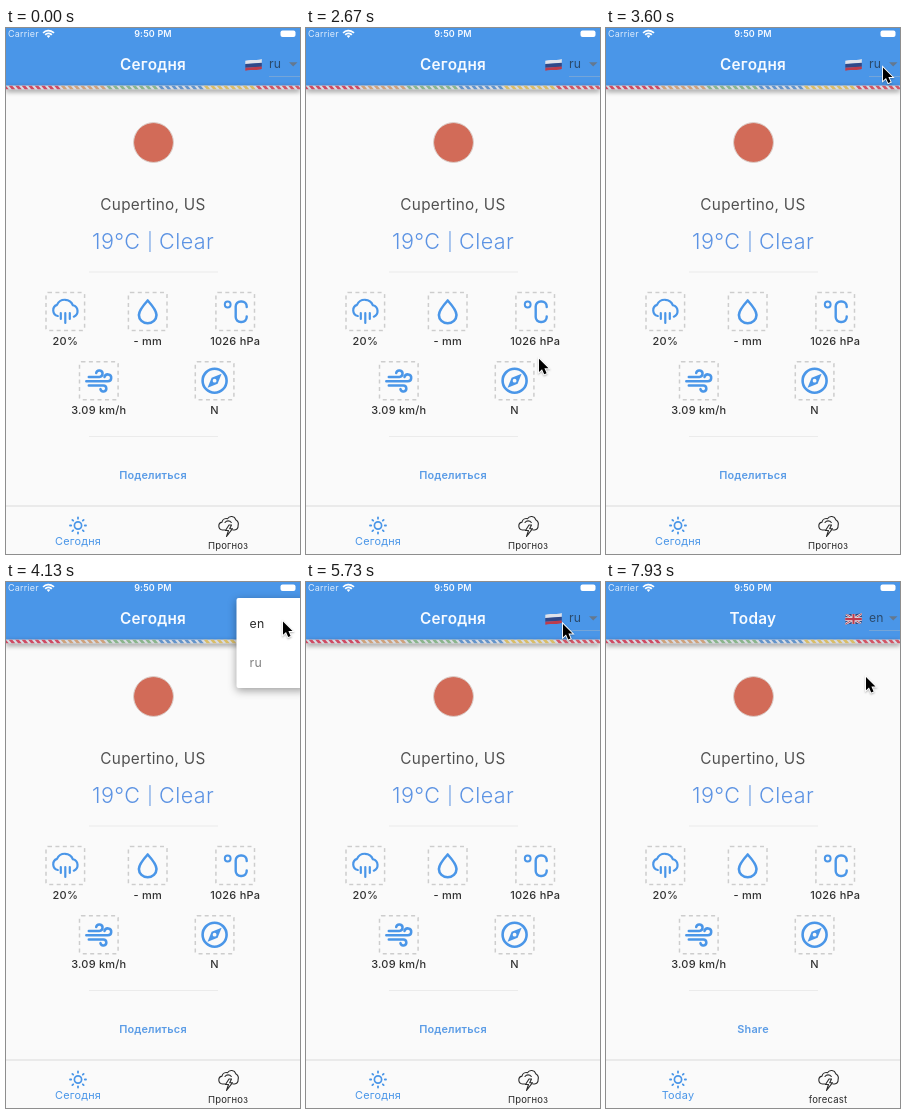
Animation of 294 by 526 pixels, one loop 8 s. Source, as an HTML page with a canvas:

```html
<!DOCTYPE html>
<html lang="en">
<head>
<meta charset="utf-8">
<title>Weather</title>
<style>
  html, body { margin: 0; width: 100%; height: 100%; overflow: hidden; background: #fafafa; }
  canvas { display: block; width: 294px; height: 526px; }
</style>
</head>
<body>
<canvas id="stage"></canvas>
<script>
const W = 294, H = 526, LOOP = 8000;
const OPEN = 3870, CLOSE = 5640, SWITCH = 5740;
const BLUE = '#4a96e8', INK = '#303030';
const FONT = 'Inter, Roboto, "Noto Sans", sans-serif';
const WORDS = {
  ru: { title: 'Сегодня', share: 'Поделиться', next: 'Прогноз' },
  en: { title: 'Today', share: 'Share', next: 'forecast' }
};
// time, x, y of the pointer tip
const TRACK = [
  [1600, 228, 540], [1870, 229, 520.5], [2400, 231, 430], [2670, 233, 331],
  [3270, 258, 200], [3560, 277, 39.5], [4250, 277, 39.5], [4750, 256, 82],
  [4920, 256, 82], [5350, 257, 42], [5800, 257, 42], [6400, 251, 140.5],
  [7440, 251, 140.5], [7900, 260, 95], [8000, 260, 95]
];

const canvas = document.getElementById('stage');
const dpr = window.devicePixelRatio || 1;
canvas.width = W * dpr;
canvas.height = H * dpr;
const c = canvas.getContext('2d');

const clamp = v => Math.max(0, Math.min(1, v));
const ease = v => { v = clamp(v); return v * v * (3 - 2 * v); };

function rect(x, y, w, h, fill) {
  c.fillStyle = fill;
  c.fillRect(x, y, w, h);
}

function text(s, x, y, size, weight, color, align = 'center') {
  c.font = `${weight} ${size}px ${FONT}`;
  c.letterSpacing = `${size * 0.02}px`;
  c.textAlign = align;
  c.fillStyle = color;
  c.fillText(s, x, y);
}

function stroke(d, color, width) {
  c.strokeStyle = color;
  c.lineWidth = width;
  c.lineCap = c.lineJoin = 'round';
  c.stroke(new Path2D(d));
}

function disc(x, y, r) {
  c.beginPath();
  c.arc(x, y, r, 0, 7);
}

function ring(x, y, r, color, width) {
  disc(x, y, r);
  c.strokeStyle = color;
  c.lineWidth = width;
  c.stroke();
}

function at(x, y, draw) {
  c.save();
  c.translate(x, y);
  draw();
  c.restore();
}

function withShadow(color, blur, dy, draw) {
  c.save();
  c.shadowColor = color;
  c.shadowBlur = blur * dpr;
  c.shadowOffsetY = dy * dpr;
  draw();
  c.restore();
}

const icons = {
  rain() {
    stroke('M-7.5 4.5A5.8 5.8 0 0 1 -8.3 -6.6A8.6 8.6 0 0 1 7.6 -6.2A6 6 0 0 1 8.5 5.2' +
      'M-4.5 1.5V7.5M0 1.5V11.5M4.5 1.5V7.5', BLUE, 2.2);
  },
  drop() {
    stroke('M0 -11C-5 -5.5 -8.8 -1 -8.8 3.5A8.8 8.3 0 0 0 8.8 3.5C8.8 -1 5 -5.5 0 -11Z', BLUE, 2.6);
  },
  celsius() {
    ring(-7.5, -7, 2.9, BLUE, 2);
    stroke('M11.5 -4.5V-5A5 5 0 0 0 6.5 -10H5.5A5 5 0 0 0 0.5 -5V5.5A5 5 0 0 0 5.5 10.5H6.5A5 5 0 0 0 11.5 5.5V5', BLUE, 2.4);
  },
  wind() {
    stroke('M-10 -3.8H0.5A3.2 3.2 0 1 0 -2.6 -7.6M-12.5 0.5H9A3.4 3.4 0 1 0 5.7 -3.6' +
      'M-10 4.8H4.5A3 3 0 1 1 1.6 8.4', BLUE, 2.5);
  },
  compass() {
    ring(0, 0, 12, BLUE, 2.6);
    c.fillStyle = BLUE;
    c.fill(new Path2D('M7 -7L3 3L-7 7L-3 -3Z'));
    c.fillStyle = '#fafafa';
    disc(0, 0, 1.9);
    c.fill();
  },
  sun() {
    ring(0, 0, 3.6, BLUE, 1.7);
    for (let i = 0; i < 8; i++) {
      c.rotate(Math.PI / 4);
      stroke('M6.8 0H8', BLUE, 1.8);
    }
  },
  storm() {
    stroke('M-3.5 4.5H-6A4 4 0 0 1 -6.5 -3.4A4.6 4.6 0 0 1 -1 -6.8A4.5 4.5 0 0 1 7.2 -5.8' +
      'A5 5 0 0 1 9.6 0A4.3 4.3 0 0 1 6 4.5H4.5M-3.5 -3A3.8 3.8 0 0 1 2.8 -3' +
      'M0.5 -0.5L-3 5H0L-2 11L4 3.2H1.2L3 -0.5Z', '#2a2a2a', 1.1);
  }
};

function tile(icon, label, x, y) {
  c.strokeStyle = '#cdcdcd';
  c.lineWidth = 1.5;
  c.lineCap = 'butt';
  c.setLineDash([4, 3.4]);
  c.beginPath();
  c.roundRect(x - 19.3, y - 19, 38.6, 38, 2);
  c.stroke();
  c.setLineDash([]);
  at(x, y, icons[icon]);
  text(label, x, y + 33.5, 11, 500, INK);
}

function stripes() {
  const colors = ['#cf4a62', '#cfa27c', '#8ab58c', '#6394cb', '#d9bd68', '#d25565'];
  withShadow('rgba(0,0,0,.45)', 5, 2, () => rect(0, 57.5, W, 4, '#d8dbe2'));
  c.save();
  c.beginPath();
  c.rect(0, 57.5, W, 4);
  c.clip();
  for (let x = -4; x < W; x += 6.5) {
    c.fillStyle = colors[Math.max(0, Math.floor(x / 49))];
    c.beginPath();
    c.moveTo(x, 57.5);
    c.lineTo(x + 3.6, 57.5);
    c.lineTo(x + 7, 61.5);
    c.lineTo(x + 3.4, 61.5);
    c.fill();
  }
  c.restore();
}

function flag(lang) {
  c.save();
  c.translate(239.3, 31.8);
  c.beginPath();
  c.moveTo(0, 1);
  c.bezierCurveTo(5, -1, 10, 1.5, 16.5, -0.8);
  c.lineTo(16.5, 9.2);
  c.bezierCurveTo(10, 11.5, 5, 9, 0, 11);
  c.clip();
  if (lang === 'ru') {
    c.rotate(-0.07);
    rect(-1, -1, 19, 5.4, '#dfe2ea');
    rect(-1, 4.2, 19, 3.8, '#304888');
    rect(-1, 7.8, 19, 6, '#bd3c4b');
  } else {
    rect(0, -1, 17, 13, '#2f4478');
    stroke('M0 0L16.5 10.5M16.5 0L0 10.5', '#dfe2ea', 2.4);
    stroke('M0 0L16.5 10.5M16.5 0L0 10.5', '#c03a4c', 0.9);
    stroke('M8.2 -1V12M-1 5.3H18', '#dfe2ea', 3.6);
    stroke('M8.2 -1V12M-1 5.3H18', '#c03a4c', 2.1);
  }
  c.restore();
}

function statusBar() {
  text('Carrier', 2, 9, 9, 400, '#dceafb', 'left');
  text('9:50 PM', 147, 9, 9, 600, '#f4f9ff');
  c.lineCap = 'butt';
  c.strokeStyle = '#fff';
  c.lineWidth = 1.7;
  for (const r of [4.4, 7.2]) {
    c.beginPath();
    c.arc(42.5, 9.8, r, -Math.PI * 0.77, -Math.PI * 0.23);
    c.stroke();
  }
  c.fillStyle = '#fff';
  c.fill(new Path2D('M42.5 10L40.6 7.8Q42.5 6.6 44.4 7.8Z'));
  c.beginPath();
  c.roundRect(274.5, 2.5, 15, 6.5, 2);
  c.fill();
}

function header(lang) {
  rect(0, 0, W, 58, BLUE);
  stripes();
  statusBar();
  text(WORDS[lang].title, 147, 42, 15.3, 600, '#f6faff');
  flag(lang);
  text(lang, 263, 40, 12.2, 400, '#2b4a6c', 'left');
  rect(263, 48, 31, 0.8, '#7fa9d6');
  c.fillStyle = '#64788f';
  c.fill(new Path2D('M283 34.2H291.5L287.2 38.4Z'));
}

function weather() {
  const color = '#5c93e3';
  text('19°C', 86, 221, 21.6, 300, color, 'left');
  text('|', 144.2, 219.5, 17.5, 300, color);
  text('Clear', 208.3, 221, 21.6, 300, color, 'right');
}

function page(lang) {
  const words = WORDS[lang];
  rect(0, 0, W, H, '#fafafa');
  disc(147.5, 114.5, 19.7);
  c.fillStyle = '#d26b58';
  c.fill();
  ring(147.5, 114.5, 19.9, '#d9c6c0', 1);
  text('Cupertino, US', 147, 182, 15.3, 400, '#505050');
  weather();
  rect(83, 243.5, 129, 1, '#ebebeb');
  tile('rain', '20%', 59.3, 283.5);
  tile('drop', '- mm', 141.7, 283.5);
  tile('celsius', '1026 hPa', 229.2, 283.5);
  tile('wind', '3.09 km/h', 92.8, 352.7);
  tile('compass', 'N', 208.6, 352.7);
  rect(83, 408, 129, 1, '#ebebeb');
  text(words.share, 147, 451, 10.9, 600, '#5b9ce6');
  rect(0, 477.5, W, 1, '#dcdcdc');
  at(72, 497.5, icons.sun);
  text(words.title, 72, 517, 10.9, 400, BLUE);
  at(222.5, 497.5, icons.storm);
  text(words.next, 222, 521, 9.5, 400, '#262626');
  header(lang);
}

function menu(t) {
  if (t < OPEN || t > CLOSE + 80) return;
  const p = (t - OPEN) / 300;
  const alpha = Math.min(clamp(p / 0.25), 1 - clamp((t - CLOSE) / 75));
  const grow = ease((p - 0.25) / 0.25);
  const top = 60 - 44 * grow, bottom = 100 + 6 * grow;
  c.globalAlpha = alpha;
  withShadow('rgba(0,0,0,.38)', 9, 2.5, () => {
    c.fillStyle = '#fff';
    c.beginPath();
    c.roundRect(230.5, top, 70, bottom - top, 2);
    c.fill();
  });
  ['en', 'ru'].forEach((s, i) => {
    c.globalAlpha = alpha * clamp((p - 0.6 - i * 0.14) / 0.22);
    text(s, 243.5, 46 + i * 38.5, 12.3, 400, '#2b2b2b', 'left');
  });
  c.globalAlpha = 1;
}

function slope(i, k) {
  const a = TRACK[i - 1], b = TRACK[i], n = TRACK[i + 1];
  if (!a || !n) return 0;
  const s = (b[k] - a[k]) / (b[0] - a[0]), e = (n[k] - b[k]) / (n[0] - b[0]);
  return s * e > 0 ? 2 * s * e / (s + e) : 0;
}

// monotone cubic through the track points
function along(t, i, k) {
  const a = TRACK[i], b = TRACK[i + 1], d = b[0] - a[0], u = (t - a[0]) / d;
  const h = u * u * (3 - 2 * u);
  return a[k] + (b[k] - a[k]) * h +
    d * u * (1 - u) * ((1 - u) * slope(i, k) - u * slope(i + 1, k));
}

function pointer(t) {
  const i = TRACK.findIndex((p, n) => n + 1 < TRACK.length && t >= p[0] && t < TRACK[n + 1][0]);
  if (i < 0) return;
  const arrow = new Path2D('M0 0V13.2L3 10.5L5.2 15.6L7.6 14.6L5.4 9.6H9.5Z');
  at(along(t, i, 1), along(t, i, 2), () => {
    withShadow('rgba(0,0,0,.3)', 2, 1, () => {
      c.strokeStyle = '#fff';
      c.lineWidth = 1.8;
      c.lineJoin = 'miter';
      c.stroke(arrow);
    });
    c.fillStyle = '#000';
    c.fill(arrow);
  });
}

function frame(now) {
  const t = now % LOOP;
  c.setTransform(dpr, 0, 0, dpr, 0, 0);
  page(t >= SWITCH ? 'en' : 'ru');
  menu(t);
  pointer(t);
  requestAnimationFrame(() => frame(performance.now() - start));
}

const start = performance.now();
frame(0);
</script>
</body>
</html>
```
